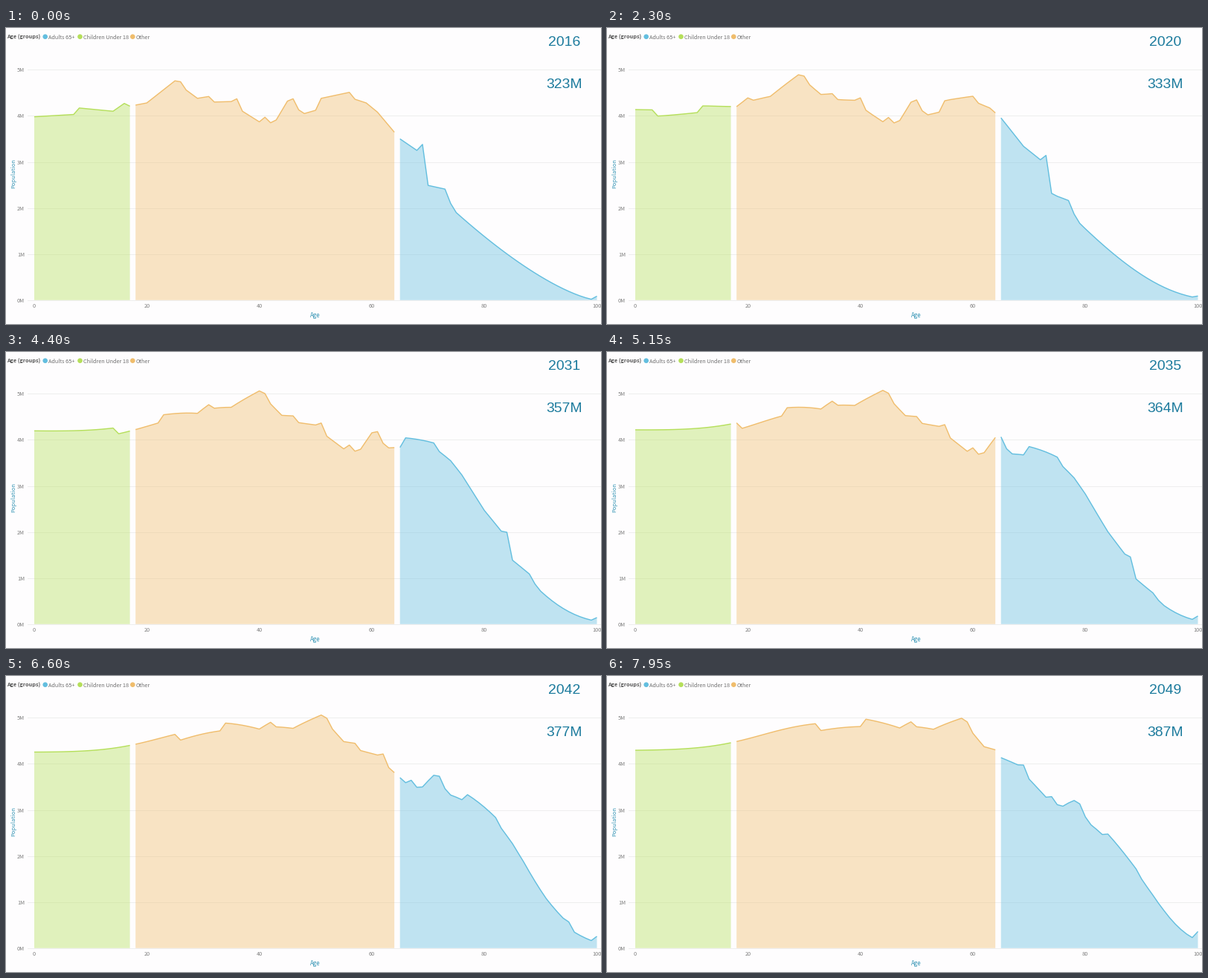
A matplotlib script that plays this animation: 800 px wide and 399 px high, repeating every 8 s.

```python
import numpy as np
import matplotlib.pyplot as plt
from matplotlib.animation import FuncAnimation
from matplotlib.patches import Circle, Polygon

W, H, DPI = 800, 399, 64
STEP, LOOP = 50, 8000
START, PERIOD, MORPH, LABEL_LAG = 1490, 198, 100, 20
FIRST_YEAR = 2016
FONT = "Noto Sans CJK JP"
TEAL, PALE_TEAL, GRAY = "#1C7B9D", "#3595B5", "#808080"
GREEN, ORANGE, BLUE = "#B5DF5A", "#F0BD6C", "#62BEDF"
AGES = np.arange(101)

# Turning points of the first year's curve: (age, millions).
KNOTS = [
    (0, 3.98), (7, 4.03), (8, 4.17), (14, 4.10), (16, 4.27), (17, 4.21),
    (20, 4.28), (25, 4.76), (26, 4.74), (27, 4.56), (29, 4.38), (31, 4.42),
    (32, 4.30), (35, 4.31), (36, 4.37), (37, 4.10), (40, 3.87), (41, 3.97),
    (42, 3.85), (43, 3.91), (45, 4.32), (46, 4.37), (47, 4.13), (48, 4.05),
    (50, 4.12), (51, 4.38), (56, 4.51), (57, 4.36), (59, 4.28), (61, 4.08),
    (65, 3.50), (68, 3.25), (69, 3.38), (70, 2.49), (73, 2.41), (74, 2.10),
    (75, 1.90),
]
KNOT_AGES, KNOT_SIZES = zip(*KNOTS)


def first_size(age):
    tail = 1.90 * ((100 - age) / 25) ** 1.43
    return np.where(age > 75, tail, np.interp(age, KNOT_AGES, KNOT_SIZES))


def migration(age, n):
    """Log gain: mostly young adults, rising slowly with the years."""
    return 0.183 / (1 + np.exp((22.5 - age) / 5.5)) + 0.018 * (n / 33) ** 2


def profile(n):
    """Millions at every age, n years after the first: each cohort moves right."""
    start_age = np.maximum(AGES - n, 0)
    born = np.maximum(n - AGES, 0)
    size = np.where(born > 0, 4.115 * np.exp(0.0013 * born), first_size(start_age))
    gain = migration(AGES, n) - migration(start_age, born)
    loss = 1.09 * np.exp(0.102 * (AGES - 90)) * (1 - np.exp(-(n / 7.5) ** 1.2))
    people = size * np.exp(gain - loss)
    people[100] = 0.085 + 0.275 * (n / 33) ** 2  # everyone of 100 and over
    return people


def total(n):
    return 323 + 2.5 * n - 0.017 * n * n


def ease(u):
    u = min(max(u, 0), 1)
    return 4 * u ** 3 if u < 0.5 else 1 - (2 - 2 * u) ** 3 / 2


def px(age):
    return 38 + 7.565 * age


def py(millions):
    return 366.8 - 62.1 * millions


def pt(pixels):
    return pixels * 72 / DPI


fig = plt.figure(figsize=(W / DPI, H / DPI), dpi=DPI, facecolor="#FEFDFE")
ax = fig.add_axes([0, 0, 1, 1])
ax.set_xlim(0, W)
ax.set_ylim(H, 0)
ax.axis("off")


def label(x, y, text, size=7.3, color=GRAY, ha="center", font=FONT, **kw):
    return ax.text(x, y, text, fontsize=pt(size), color=color, ha=ha,
                   va=kw.pop("va", "center_baseline"), family=font, **kw)


for m in range(6):
    ax.plot([29, W], [py(m)] * 2, color="#EEEEEE", lw=pt(1), zorder=1)
    label(25, py(m), f"{m}M", ha="right")
for age in range(0, 101, 20):
    label(px(age), 374, str(age))
label(415.5, 387, "Age", 7.9, PALE_TEAL)
label(10, 196.5, "Population", 7.6, PALE_TEAL, rotation=90, va="center")

label(1, 11.7, "Age (groups)", 7.2, "#555555", ha="left", weight="bold")
for x, color, name in [(52.7, BLUE, "Adults 65+"), (99.5, GREEN, "Children Under 18"),
                       (170.3, ORANGE, "Other")]:
    ax.add_patch(Circle((x, 11.7), 3.3, color=color, lw=0))
    label(x + 4.4, 11.7, name, 7.3, "#707070", ha="left")

areas = []
for lo, hi, color in [(0, 17, GREEN), (18, 64, ORANGE), (65, 100, BLUE)]:
    fill = ax.add_patch(Polygon([(0, 0)] * 3, facecolor=color, alpha=0.4, lw=0, zorder=2))
    line, = ax.plot([], [], color=color, lw=pt(1.4), solid_capstyle="butt",
                    solid_joinstyle="round", zorder=3)
    areas.append((slice(lo, hi + 1), fill, line))

big = dict(size=19.4, color=TEAL, font="Liberation Sans")
year_text = label(750.5, 17.4, "", **big)
total_text = label(750.5, 74.4, "", **big)


def draw(i):
    t = i * STEP - START
    k = max(t // PERIOD, 0)
    e = ease((t - k * PERIOD) / MORPH)
    people = (1 - e) * profile(k) + e * profile(k + 1)
    for part, fill, line in areas:
        x, y = px(AGES[part]), py(people[part])
        line.set_data(x, y)
        fill.set_xy([(x[0], py(0)), *zip(x, y), (x[-1], py(0))])

    n = max((t - LABEL_LAG) // PERIOD + 1, 0)
    year_text.set_text(str(FIRST_YEAR + n))
    total_text.set_text(f"{total(n):.0f}M")
    return [year_text, total_text]


anim = FuncAnimation(fig, draw, frames=LOOP // STEP, interval=STEP,
                     init_func=lambda: draw(0), repeat=True, repeat_delay=0)
plt.show()
```
